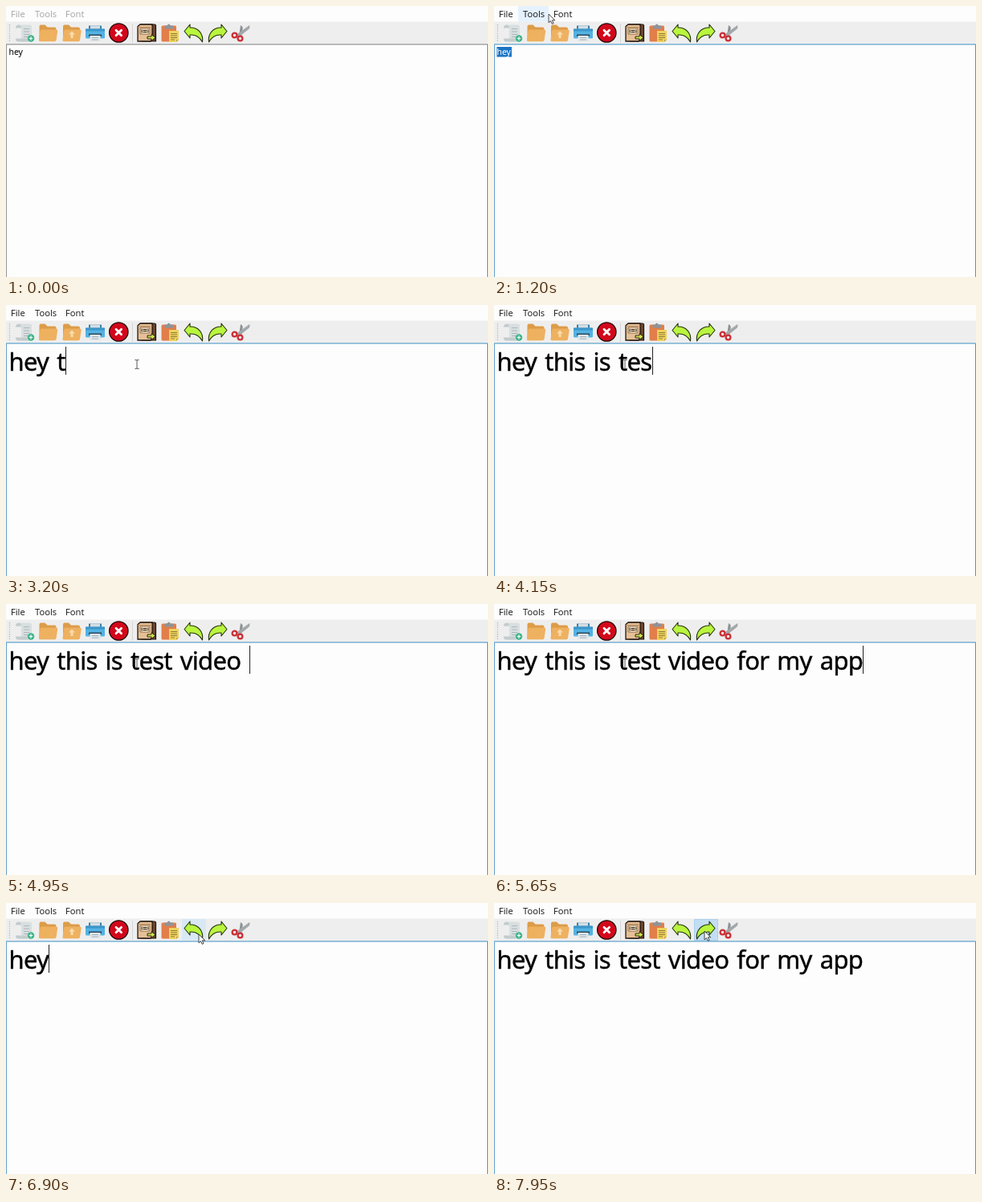
An HTML page that plays this animation: 600 by 338 pixels, repeating every 8 s.

```html
<!DOCTYPE html>
<html lang="en">
<head>
<meta charset="utf-8">
<title>Text editor</title>
<style>
html, body { margin: 0; width: 100%; height: 100%; overflow: hidden; background: #fdfdfd; }
svg { display: block; width: 100vw; height: 100vh; }
text { white-space: pre; }
.menu text { font: 11.2px "Open Sans", "Noto Sans", sans-serif; animation: menuText 8s step-end infinite; }
#line { font-family: "Noto Sans", "Open Sans", sans-serif; }
#line.small { font-size: 10.5px; letter-spacing: -.1px; }
#line.big { font-size: 31px; letter-spacing: -.75px; word-spacing: 2.8px; stroke: #000; stroke-width: .4px; }

.frame { animation: frame 8s step-end infinite; }
.tools { animation: tools 8s step-end infinite; }
.fontHover { animation: fontHover 8s step-end infinite; }
.fontOpen { animation: fontOpen 8s step-end infinite; }
.undoHover { animation: undoHover 8s step-end infinite; }
.redoHover { animation: redoHover 8s step-end infinite; }
.redoDown { animation: redoDown 8s step-end infinite; }
.mouse { animation: path 8s linear infinite; }
.arrow { animation: arrow 8s step-end infinite; }
.beam { animation: beam 8s step-end infinite; }

@keyframes menuText { 0% { fill: #a3a3a3 } 6.25%, 100% { fill: #111 } }
@keyframes frame { 0% { stroke: #7c7c7c } 6.25%, 100% { stroke: #3b8dc3 } }
@keyframes tools { 0% { opacity: 0 } 14.2% { opacity: 1 } 15.3%, 100% { opacity: 0 } }
@keyframes fontHover { 0% { opacity: 0 } 15.3% { opacity: 1 } 17.5%, 100% { opacity: 0 } }
@keyframes fontOpen { 0% { opacity: 0 } 17.5% { opacity: 1 } 34.4%, 100% { opacity: 0 } }
@keyframes undoHover { 0% { opacity: 0 } 79.4% { opacity: 1 } 88.8%, 100% { opacity: 0 } }
@keyframes redoHover { 0% { opacity: 0 } 88.8% { opacity: 1 } 92%, 100% { opacity: 0 } }
@keyframes redoDown { 0% { opacity: 0 } 92%, 100% { opacity: 1 } }
@keyframes path {
  0%, 6.9% { transform: translate(120px, 90px) }
  10%, 11.25% { transform: translate(22px, 58px) }
  15% { transform: translate(68px, 10px) }
  16.9%, 23.5% { transform: translate(84px, 9px) }
  26.9% { transform: translate(101px, 32px) }
  29.2% { transform: translate(163px, 78px) }
  31.25%, 34.4% { transform: translate(163px, 77px) }
  35%, 75% { transform: translate(163px, 74px) }
  80.6%, 87.5% { transform: translate(240px, 39px) }
  90.6%, 100% { transform: translate(262px, 35px) }
}
@keyframes arrow { 0% { opacity: 0 } 12% { opacity: 1 } 35% { opacity: 0 } 79.2%, 100% { opacity: 1 } }
@keyframes beam { 0% { opacity: 0 } 6.9% { opacity: 1 } 12% { opacity: 0 } 35% { opacity: 1 } 79.2%, 100% { opacity: 0 } }
</style>
</head>
<body>
<svg viewBox="0 0 600 338" preserveAspectRatio="none">
  <defs>
    <g id="folder">
      <path d="M-11 10V-8q0-2 2-2h5l3 3h9q2 0 2 2V8z" fill="#dd9c48"/>
      <path d="M-8-4h18q2 0 1.700 2L10 9q-.3 1.700-2 1.700h-18q-1.700 0-1.500-1.700l1.500-11q.3-2 2-2z" fill="#eeb160"/>
    </g>
    <path id="curve" d="M-12-2L-5-10.500V-6.500C5-7 12 1 10.500 11.500C7 5 2 2-5 2.500V6.500z" fill="#b9f53f" stroke="#26330c" stroke-width="1.100" stroke-linejoin="round"/>
  </defs>

  <rect width="600" height="338" fill="#fdfdfd"/>
  <rect y="19.500" width="600" height="28" fill="#eeeeee"/>

  <g class="menu">
    <rect class="tools" x="30" width="38" height="19.500" fill="#e5f2fd"/>
    <rect class="fontHover" x="68" width="35.500" height="19.500" fill="#e5f2fd"/>
    <rect class="fontOpen" x="68.500" y=".5" width="34.500" height="17.800" fill="#cce8fd" stroke="#98cef5"/>
    <text x="6" y="14">File</text>
    <text x="36" y="14">Tools</text>
    <text x="74" y="14">Font</text>
  </g>

  <path d="M4.500 23V45" stroke="#b4b4b4" stroke-width="1.200" stroke-dasharray="1.200 1.600"/>
  <path d="M157.500 22V46" stroke="#d6d6d6"/>
  <rect class="undoHover" x="219" y="20" width="30" height="26.500" fill="#d8e8f5"/>
  <rect class="redoHover" x="249" y="20" width="30" height="26.500" fill="#d8e8f5"/>
  <rect class="redoDown" x="249.500" y="20.500" width="29" height="26" fill="#c2def4" stroke="#8dc3ee" stroke-dasharray="1.500 1"/>

  <g transform="translate(0 .5)">
    <!-- new -->
    <g transform="translate(23 33)">
      <path d="M-7-10H7q2 0 2 3V8q0 3-3 3H-4V-6q0-4-3-4z" fill="#d8dfe1"/>
      <path d="M-7-10q3 0 3 4h-7q0-4 4-4zM-11 7H3q0 4 3 4H-8q-3 0-3-4z" fill="#c3cbcd"/>
      <path d="M-1-5H6M-1-1.500H6M-1 2H6M-1 5H4" stroke="#acb6b8" stroke-width="1.100"/>
      <circle cx="8" cy="7" r="4.300" fill="#40b58a"/>
      <path d="M5.700 7h4.600M8 4.700v4.600" stroke="#fff" stroke-width="1.200"/>
    </g>

    <!-- open, save -->
    <use href="#folder" x="52.500" y="33"/>
    <use href="#folder" x="82" y="33"/>
    <path d="M82 31l4 4h-2.500v4.500h-3V35H78z" fill="#f9dcae"/>

    <!-- print -->
    <g transform="translate(111 33)">
      <path d="M-8-9H8V-3H-8z" fill="#3f7fa6"/>
      <path d="M-6-9H6V-4H-6z" fill="#d3dde2"/>
      <rect x="-12" y="-5" width="24" height="12" rx="1.500" fill="#52b2e2"/>
      <path d="M-12-5H12V-2H-12z" fill="#3c95c8"/>
      <path d="M-8 2H8V4.500H-8z" fill="#2f4a5e"/>
      <path d="M-6.500 3.500H6.500V10.500H-6.500z" fill="#dfe6e9"/>
      <path d="M-4 6H4M-4 8.500H4" stroke="#a3b2ba"/>
    </g>

    <!-- close -->
    <circle cx="140.300" cy="33" r="11.700" fill="#d3071b" stroke="#21090b" stroke-width="1.300"/>
    <path d="M137 29.700l6.600 6.600m0-6.600l-6.600 6.600" stroke="#fff" stroke-width="2.800" stroke-linecap="round"/>

    <!-- copy -->
    <g transform="translate(175 33)" stroke="#21160f">
      <path d="M-7-10.500H10q1.500 0 1.500 1.500V10.500H-6z" fill="#6f4630" stroke-width="1.200"/>
      <path d="M-11-8l3-2.500H7V8l-2 2.500H-11z" fill="#e6c096" stroke-width="1.300"/>
      <path d="M-11-7H7" stroke="#b58a60"/>
      <path d="M-8-5.500H4V1.500H-8z" fill="#f6e2c2" stroke="#7d5a3c" stroke-width=".8"/>
      <path d="M-6-4v4M2-4v4M-4.500-3h5M-4.500-1h5" stroke-width="1"/>
      <path d="M1 4.500h5V2l5 4-5 4V7.500H1z" fill="#c9e04b" stroke-width=".9"/>
    </g>

    <!-- paste -->
    <g transform="translate(204 33)">
      <rect x="-10.500" y="-9" width="18.500" height="20" rx="1.500" fill="#e27e4a"/>
      <path d="M-6.500-9h3q2-4 4.500 0h3v4H-6.500z" fill="#8d9499"/>
      <path d="M-1-2.500H11V8.500l-3 3H-1z" fill="#efd35c"/>
      <path d="M1 1h8M1 3.500h8M1 6h8M1 8.500h5" stroke="#8d7a38"/>
      <path d="M8 11.500V8.500h3z" fill="#c7a83f"/>
    </g>

    <!-- undo, redo -->
    <use href="#curve" x="234" y="33"/>
    <use href="#curve" transform="translate(263 33) scale(-1 1)"/>

    <!-- cut -->
    <g transform="translate(292 33)" fill="none">
      <path d="M-2 4L0-9.500q3.500 2 2.500 5L1 5z" fill="#8c9194"/>
      <path d="M-5 2L11-9.500q1.500 3-1.500 5.500L-2 5z" fill="#a3a8aa"/>
      <circle cx="-7.500" cy="3" r="2.900" stroke="#cb3036" stroke-width="2.300"/>
      <circle cx="-.5" cy="7" r="2.900" stroke="#cb3036" stroke-width="2.300"/>
    </g>
  </g>

  <path class="frame" d="M.3 340V47.900H599.600V340" fill="none"/>

  <rect id="mark" x="3.500" y="51" width="18.500" height="12.500" fill="#1a74c4"/>
  <text id="line" x="3.600"></text>
  <rect id="caret" y="52" width="1" fill="#222"/>

  <g class="mouse">
    <path class="arrow" d="M0 0V10.800L2.500 8.500L4.200 12.300L6 11.500L4.300 7.800H7.800z" fill="#fff" stroke="#333" stroke-width=".9"/>
    <path class="beam" d="M-2.500-5.500H-.8L0-5L.8-5.500H2.500M0-5V5M-2.500 5.500H-.8L0 5L.8 5.500H2.500" fill="none" stroke="#444" stroke-width=".9"/>
  </g>
</svg>

<script>
const LOOP = 8000, BLINK = 530;
const FULL = "hey this is test video for my app";
const SELECT = 850, DESELECT = 1450, ENLARGE = 2750, UNDO = 6550, REDO = 7400;
// [ms, characters shown]
const TYPING = [[3000, 3], [3850, 14], [4000, 14], [4140, 15], [4800, 23], [4950, 23], [5600, 33]];

const [line, caret, mark] = ["line", "caret", "mark"].map(id => document.getElementById(id));

function typed(t) {
  if (t < TYPING[0][0]) return 3;
  for (let i = 1; i < TYPING.length; i++) {
    const [t0, n0] = TYPING[i - 1], [t1, n1] = TYPING[i];
    if (t < t1) return Math.floor(n0 + (n1 - n0) * (t - t0) / (t1 - t0));
  }
  return FULL.length;
}

function lastEdit(t) {
  if (t >= REDO) return REDO;
  if (t >= UNDO) return UNDO;
  return Math.min(t, TYPING[TYPING.length - 1][0]);
}

function draw(t) {
  const big = t >= ENLARGE;
  const selected = t >= SELECT && t < DESELECT;
  const count = t >= UNDO && t < REDO ? 3 : typed(t);
  line.textContent = FULL.slice(0, count);
  line.setAttribute("class", big ? "big" : "small");
  line.setAttribute("y", big ? 81.7 : 61);
  line.setAttribute("fill", selected ? "#fff" : "#000");
  mark.style.opacity = selected ? 1 : 0;

  const on = big && (t - lastEdit(t)) % (2 * BLINK) < BLINK;
  caret.style.opacity = on ? 1 : 0;
  caret.setAttribute("height", big ? 35 : 11);
  caret.setAttribute("x", Math.round(3.6 + line.getComputedTextLength() + .3));
}

let start;
function tick(now) {
  start ??= now;
  draw((now - start) % LOOP);
  requestAnimationFrame(tick);
}
draw(0);
requestAnimationFrame(tick);
</script>
</body>
</html>
```
